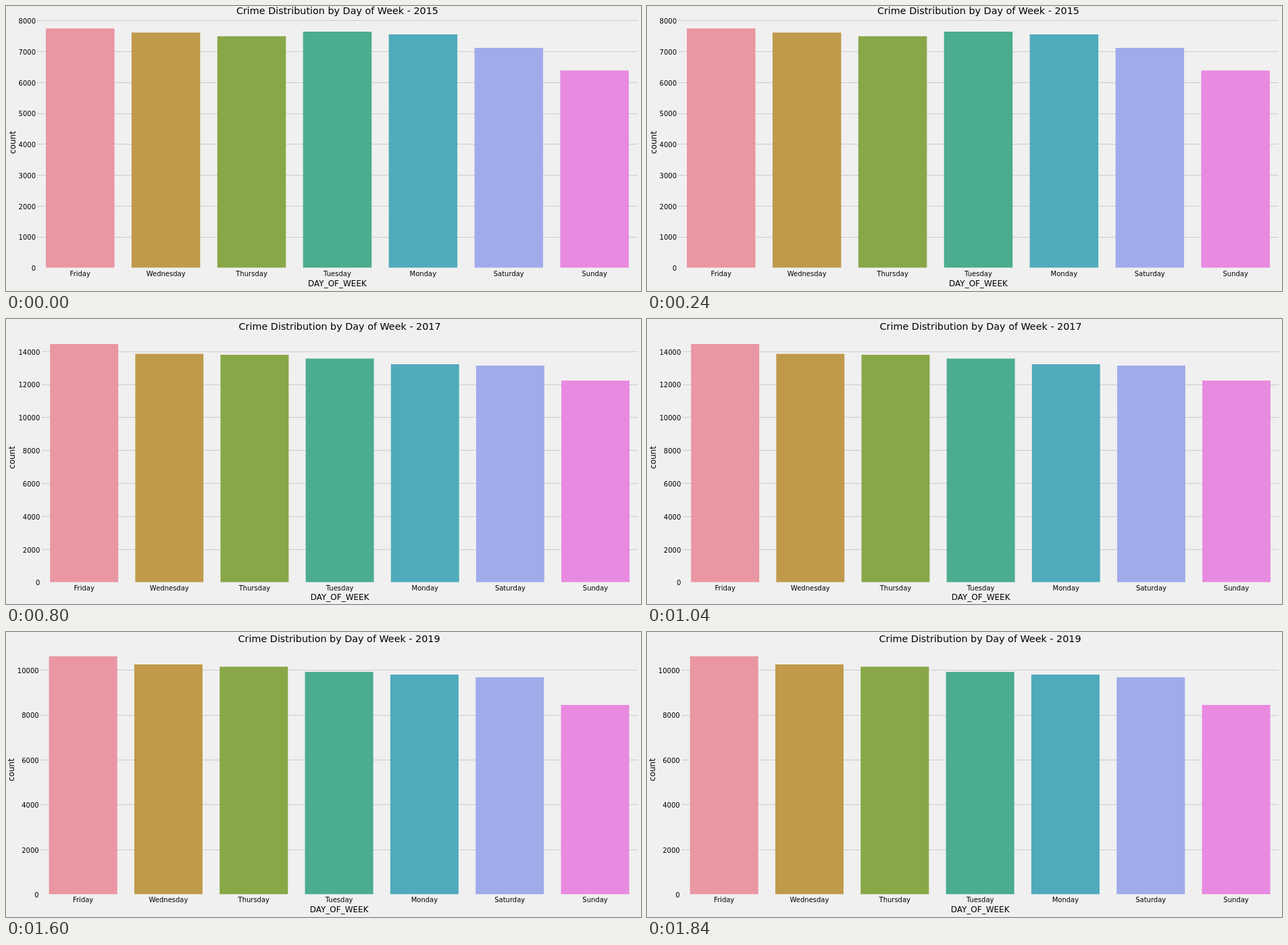
Recreate the animation shown at these times as an HTML page with a canvas. Size 940x422 px, loop 2 s.

```html
<!DOCTYPE html>
<html lang="en">
<head>
<meta charset="utf-8">
<title>Crime distribution by day of week</title>
<style>
  html, body { margin: 0; width: 100%; height: 100%; overflow: hidden; background: #f0f0f0; }
  canvas { display: block; }
</style>
</head>
<body>
<canvas id="stage" width="940" height="422"></canvas>
<script>
const ctx = document.getElementById("stage").getContext("2d");
const HOLD = 400;
const DAYS = ["Friday", "Wednesday", "Thursday", "Tuesday", "Monday", "Saturday", "Sunday"];
const COLORS = ["#ea96a3", "#c09a4a", "#88a747", "#4bac8f", "#4fabbb", "#a1abea", "#e88ae0"];

// left: first bar's edge, zero: y of the zero line, gap: pixels between ticks,
// tops: y of each bar's upper edge; the other y values are text centres
const CHARTS = [
  { year: 2015, left: 59, pitch: 126.9, zero: 388, gap: 45.78, step: 1000, ticks: 8,
    titleY: 7, dayY: 396, axisY: 410.3, countX: 13.5, countY: 202,
    tops: [33.2, 39.3, 44.8, 38, 42, 62, 95.5] },
  { year: 2016, left: 65, pitch: 125.85, zero: 388.2, gap: 50, step: 2000, ticks: 7,
    titleY: 10, dayY: 396, axisY: 410.3, countX: 13, countY: 204,
    tops: [36, 52.7, 51, 53.3, 57.6, 59, 91.5] },
  { year: 2017, left: 65.2, pitch: 126.15, zero: 390.2, gap: 48.84, step: 2000, ticks: 7,
    titleY: 11, dayY: 398, axisY: 412, countX: 13, countY: 205,
    tops: [37, 51.6, 53, 58.6, 67, 69, 91.2] },
  { year: 2018, left: 65.2, pitch: 126.28, zero: 388.2, gap: 50.45, step: 2000, ticks: 7,
    titleY: 9, dayY: 396, axisY: 410.3, countX: 13, countY: 203.5,
    tops: [35, 44, 47.6, 53, 50.3, 58.7, 95] },
  { year: 2019, left: 63.6, pitch: 126.32, zero: 388.8, gap: 66.45, step: 2000, ticks: 5,
    titleY: 10, dayY: 396.7, axisY: 411, countX: 12.3, countY: 204,
    tops: [36, 48, 51.4, 59, 63, 67, 108] }
];

function label(text, x, y, size, align = "center") {
  ctx.font = `${size}px "DejaVu Sans", sans-serif`;
  ctx.textAlign = align;
  ctx.fillStyle = "#000";
  ctx.fillText(text, x, y + size * 0.365);
}

function drawChart(c) {
  const barWidth = c.pitch * 0.8;
  const axisLeft = c.left - c.pitch * 0.1;
  const axisWidth = c.pitch * DAYS.length;
  const middle = axisLeft + axisWidth / 2;

  ctx.fillStyle = "#f0f0f0";
  ctx.fillRect(0, 0, 940, 422);

  for (let i = 0; i <= c.ticks; i++) {
    const y = c.zero - i * c.gap;
    if (i) {
      ctx.fillStyle = "#cbcbcb";
      ctx.fillRect(axisLeft, Math.floor(y), axisWidth, 1);
    }
    label(i * c.step, axisLeft - 2.3, y + 0.6, 10, "right");
  }

  DAYS.forEach((day, i) => {
    const x = c.left + i * c.pitch;
    ctx.fillStyle = COLORS[i];
    ctx.fillRect(x, c.tops[i], barWidth, c.zero - 0.6 - c.tops[i]);
    label(day, x + barWidth / 2, c.dayY, 10);
  });

  label("Crime Distribution by Day of Week - " + c.year, middle, c.titleY, 14.35);
  label("DAY_OF_WEEK", middle, c.axisY, 12);

  ctx.save();
  ctx.translate(c.countX, c.countY);
  ctx.rotate(-Math.PI / 2);
  label("count", 0, -12 * 0.365, 12);
  ctx.restore();
}

function frame() {
  drawChart(CHARTS[Math.floor(performance.now() / HOLD) % CHARTS.length]);
  requestAnimationFrame(frame);
}
frame();
</script>
</body>
</html>
```
